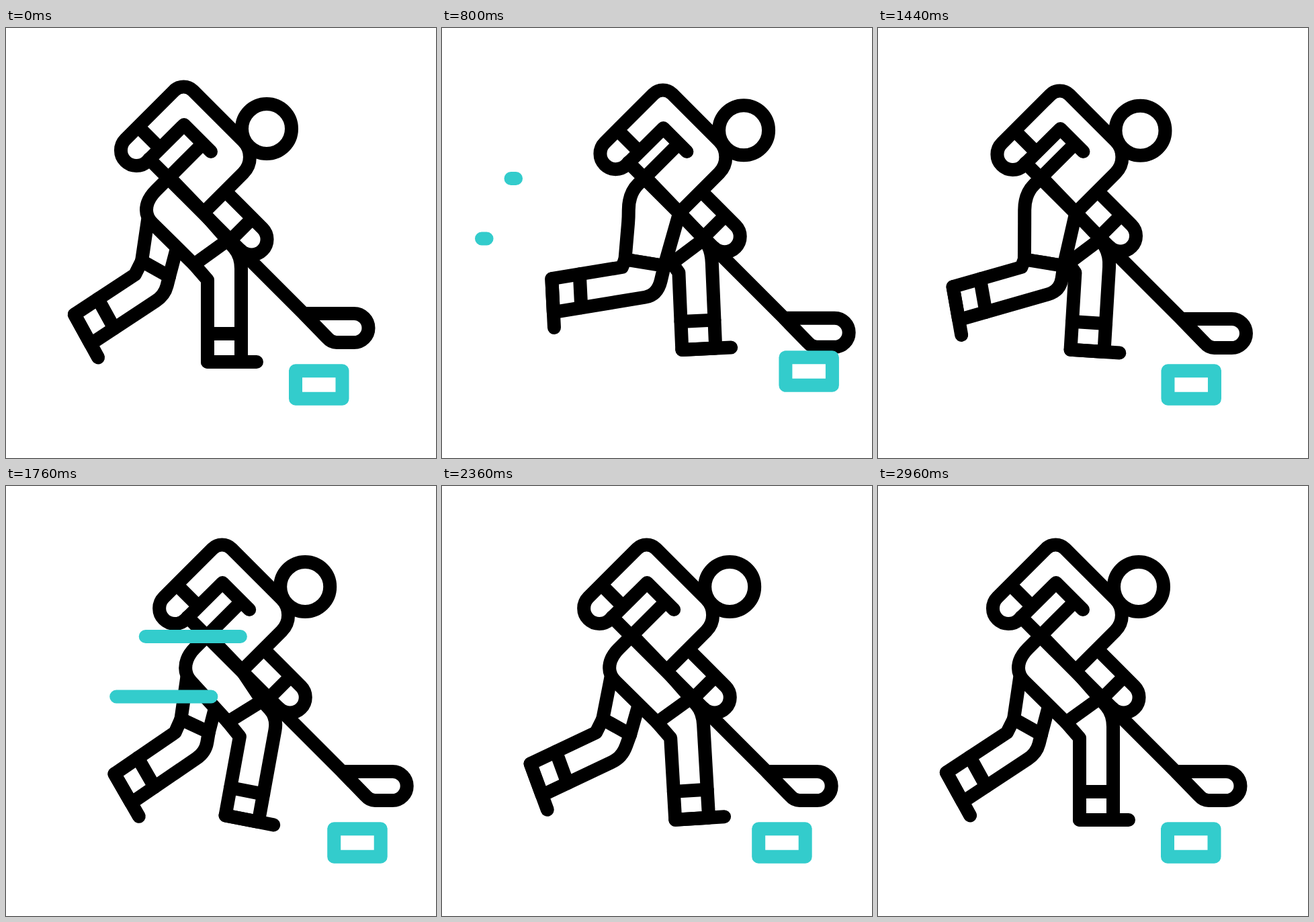
Write an HTML page that moves like this. It is 640 px wide and 640 px high and loops after 3 s.

```html
<!DOCTYPE html>
<html lang="en">
<head>
<meta charset="utf-8">
<title>Hockey player</title>
<style>
  html, body { margin: 0; width: 100%; height: 100%; overflow: hidden; background: #fff; }
  svg { display: block; width: 100vw; height: 100vh; }
  svg * { fill: none; stroke: #000; stroke-width: 20; stroke-linecap: round; stroke-linejoin: round; }
  .solid { fill: #fff; }
  .accent { stroke: #3cc; }
</style>
</head>
<body>
<svg viewBox="0 0 640 640">
  <g id="player">
    <path id="farThigh" class="solid"/>
    <path id="farShin" class="solid"/>
    <path id="farFoot"/>
    <path id="nearThigh" class="solid"/>
    <path id="nearShin" class="solid"/>
    <path id="nearFoot"/>
    <path id="torso"/>
    <path id="arm"/>
    <path id="stick"/>
    <circle id="head" r="37"/>
  </g>
  <rect id="puck" class="accent" x="431" y="510.3" width="69.5" height="41.5"/>
  <path id="speed" class="accent"/>
</svg>
<script>
const LOOP = 3000, STRIDE = 80;
const el = id => document.getElementById(id);
const draw = (id, d) => el(id).setAttribute('d', d);
const ease = (t, a, b) => {
  const u = Math.min(1, Math.max(0, (t - a) / (b - a)));
  return u * u * (3 - 2 * u);
};
const lerp = (a, b, k) => a + (b - a) * k;
const mix = (p, q, k) => [lerp(p[0], q[0], k), lerp(p[1], q[1], k)];
const at = (x, y, d) => [x + d, y + d];

// Each leg moves between two poses. Angles are degrees back from upright;
// glide is how far the shin tilts either way during a stride.
const near = {
  lag: .55,
  planted: { back: [280, 352], front: [330, 316], top: [300, 375], angle: -3.3, glide: 3.3, length: 122, calf: 1.29 },
  trailing: { back: [214.5, 344.5], front: [273, 354], top: [210, 356], angle: 78.5, glide: -4.5, length: 106, calf: 1.48 }
};
const far = {
  lag: 1.6,
  planted: { back: [283, 350], front: [331, 314], top: [293, 364], angle: -.5, glide: 4, length: 115, calf: 1.25 },
  trailing: { back: [199, 347], front: [240, 370], top: [189, 367], angle: 64.6, glide: -8, length: 108, calf: 1.22 }
};

// plant: 0 trailing to 1 planted; tilt: -1 to 1 over a stride
function poseLeg({ lag, planted, trailing }, plant, tilt) {
  const knee = plant ** lag;
  const point = name => {
    const [x, y] = mix(trailing[name], planted[name], knee);
    return [x + 3 * tilt * (1 - plant), y];
  };
  const value = name => lerp(trailing[name], planted[name], plant);
  const angle = (value('angle') + value('glide') * tilt) * Math.PI / 180;
  const top = point('top'), length = value('length');
  return {
    back: point('back'), front: point('front'), top, angle, length,
    heel: [top[0] - length * Math.sin(angle), top[1] + length * Math.cos(angle)],
    calf: value('calf')
  };
}

function drawShin(name, { back, front, top, heel, angle, length, calf }) {
  const turn = angle * 1.08;
  const along = d => [heel[0] + d * Math.cos(turn), heel[1] + d * Math.sin(turn)];
  const rise = (p, k) => [p[0] + (top[0] - heel[0]) * k, p[1] + (top[1] - heel[1]) * k];
  const ankle = along(50), bulge = rise(ankle, calf), sock = 42 / length;
  draw(name + 'Shin', `M${back}L${top}L${heel}L${ankle}L${mix(bulge, ankle, .12)}`
    + `Q${bulge} ${mix(front, bulge, .5)}L${front}Z`);
  draw(name + 'Foot', `M${heel}L${along(73)}M${rise(heel, sock)}L${rise(ankle, sock)}`);
}

function drawLegs(swing, tilt) {
  const n = poseLeg(near, 1 - swing, tilt), f = poseLeg(far, swing, tilt);
  const hip = 209 + (280 - n.back[0]) * .14;
  const bend = [hip, 282];
  const groin = 295 - Math.max(0, 280 - f.back[0]) * .35;
  draw('farThigh', `M${hip + 2} 286L${f.back}L${f.front}L${groin} 276`);
  drawShin('far', f);
  draw('nearThigh', `M243 222L${hip + 14} ${451 - hip}Q${hip} ${465 - hip} ${hip} 271`
    + `Q${bend} ${mix(bend, n.back, .13)}L${n.back}L${n.front}L294 275Z`);
  drawShin('near', n);
}

// Crouching slides the arms and the stick along their own diagonals
function drawBody(crouch) {
  const s = 6 * crouch, h = -5 * crouch, k = 8 * crouch;
  draw('torso', `M305 184L${at(265, 144, s)}L${at(210.3, 198.3, s)}A23 23 0 0 1 ${at(177.7, 165.7, s)}`
    + `L${at(250.2, 93.3, s)}A20 20 0 0 1 ${at(278.4, 93.3, s)}L353 168A34 34 0 0 1 353 216L294 275`
    + `M${at(198, 148, s)}L${at(229, 179, s)}M293 172L243 222`);
  draw('arm', `M326.8 243.2L${at(381.8, 298.2, h)}A23 23 0 0 1 ${at(349.2, 330.8, h)}`
    + `M${at(366.5, 283.5, h)}L${at(334, 316, h)}`);
  draw('stick', `M${at(213, 195, s)}L${at(443, 425, k)}h75a21.5 21.5 0 0 1 0 43h-26`
    + `q-8 0 -14 -7L${at(443, 425, k)}`);
  el('head').setAttribute('cx', 388 + 2 * crouch);
  el('head').setAttribute('cy', 150 + 2.7 * crouch);
}

function drawSpeed(t) {
  const start = t < LOOP / 2 ? 211 : 1519;
  const lead = ease(t, start, start + 435), tail = ease(t, start + 200, start + 635);
  const line = (x, y) => `M${x - 253 * tail} ${y}H${x - 253 * lead}`;
  draw('speed', lead - tail > .001 ? line(355.5, 224) + line(312, 313.5) : '');
}

function render(t) {
  const reach = ease(t, 95, 460) - ease(t, 460, 1487) + ease(t, 1533, 1885) - ease(t, 1885, 2840);
  const swing = ease(t, 60, 430) - ease(t, 1490, 1860);
  const push = 20 * (ease(t, 0, 640) - ease(t, 840, 1440));
  const x = STRIDE * reach;
  el('player').setAttribute('transform', `translate(${x} 0)`);
  el('puck').setAttribute('transform', `translate(${x + push * 1.05} ${-push})`);
  drawLegs(swing, 1 - 2 * reach);
  drawBody(ease(t, 560, 880) - ease(t, 1460, 1710));
  drawSpeed(t);
}

const begin = performance.now();
function tick() {
  render((performance.now() - begin) % LOOP);
  requestAnimationFrame(tick);
}
tick();
</script>
</body>
</html>
```
